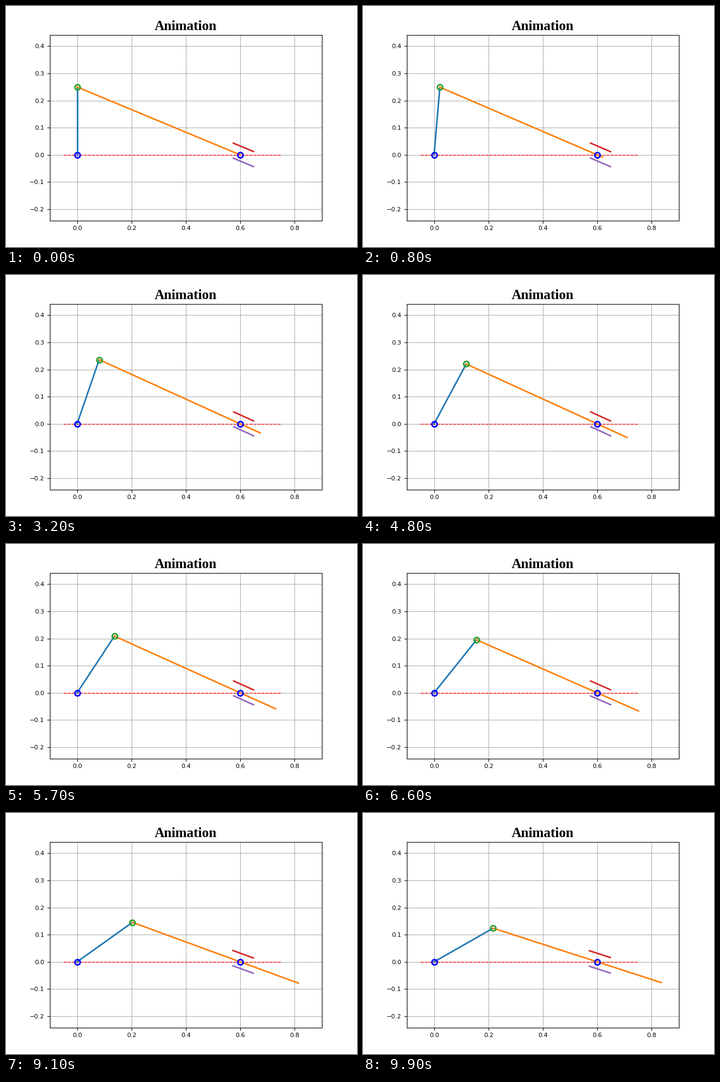
Recreate the animation shown at these times as a matplotlib script. Size 640 by 440 pixels, loop 10 s.

```python
import numpy as np
import matplotlib.pyplot as plt
from matplotlib.animation import FuncAnimation

CRANK, ROD, BASE = 0.25, 0.65, 0.6   # link lengths and pivot distance
HALF_W, HALF_H = 0.04, 0.03          # sliding block
STEP = 0.0025                        # rod travel through the block per frame
FRAMES, INTERVAL = 100, 100

plt.rcParams["font.family"] = "DejaVu Sans"
fig, ax = plt.subplots(figsize=(6.4, 4.4), dpi=100)
ax.set_title("Animation", fontname="Liberation Serif", fontsize=18, fontweight="bold")
ax.set_xticks(np.arange(0, 5) * 0.2)
ax.set_yticks(np.arange(-2, 5) * 0.1)
ax.tick_params(labelsize=8)
ax.set_xlim(-0.1, 0.9)
ax.set_ylim(0.1 - 0.34153, 0.1 + 0.34153)
ax.grid(True)

RING = dict(ls="none", marker="o", ms=7, mew=2, mfc="none")

ax.plot([-0.05, 0.75], [0, 0], "r--", lw=1)
crank, = ax.plot([], [], color="C0", lw=2)
rod, = ax.plot([], [], color="C1", lw=2)
joint, = ax.plot([], [], color="C2", **RING)
upper, = ax.plot([], [], color="C3", lw=2)
lower, = ax.plot([], [], color="C4", lw=2)
ax.plot([0, BASE], [0, 0], color="b", **RING)


def update(i):
    # Law of cosines: the joint-to-pivot distance gives the crank angle.
    dist = ROD - STEP * i
    cos_a = (CRANK**2 + BASE**2 - dist**2) / (2 * CRANK * BASE)
    x, y = CRANK * cos_a, CRANK * np.sqrt(1 - cos_a**2)
    c, s = (BASE - x) / dist, y / dist

    crank.set_data([0, x], [0, y])
    rod.set_data([x, x + ROD * c], [y, y - ROD * s])
    joint.set_data([x], [y])

    side = np.array([-HALF_W, HALF_W])
    block_x = BASE + side * c + HALF_H * s
    upper.set_data(block_x, -side * s + HALF_H * c)
    lower.set_data(block_x, -side * s - HALF_H * c)
    return crank, rod, joint, upper, lower


anim = FuncAnimation(fig, update, frames=FRAMES, interval=INTERVAL,
                     repeat=True, repeat_delay=0, blit=False)
plt.show()
```
